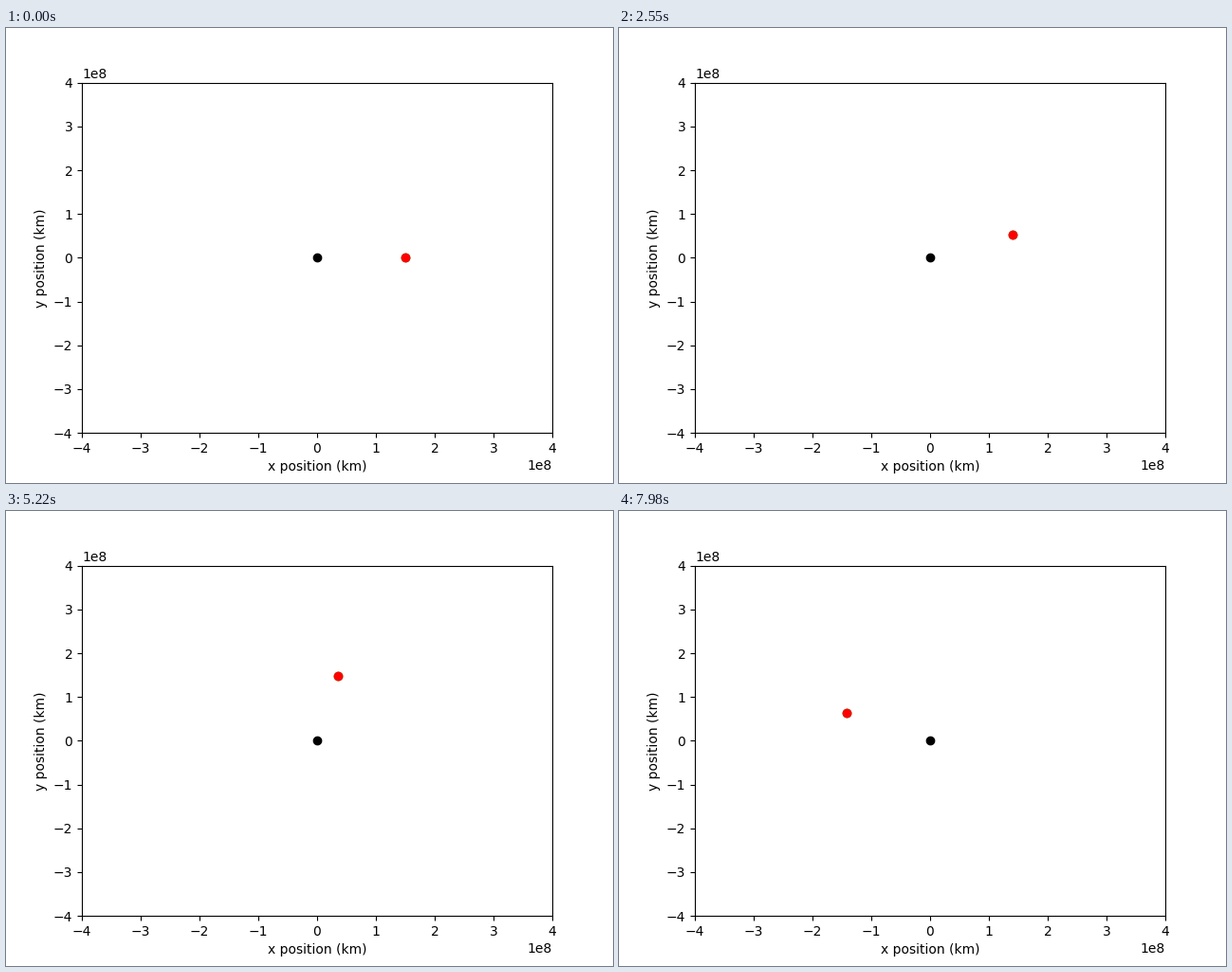
These frames come from a looping animation (640x480 px, 8 s). A matplotlib script:

```python
import math

import matplotlib.pyplot as plt
from matplotlib.animation import FuncAnimation

TICK_MS = 20
TICKS = 400
STEP_MS = 30           # the orbit advances once per step

# Planet orbit (km, degrees per step)
SEMI_MAJOR = 1.531e8
ECC = 0.0203
MEAN_MOTION = 8.702

# Moon orbit around the planet
MOON_DIST = 3.844e5
MOON_MOTION = 123.67


def planet_pos(step):
    """Kepler orbit starting at perihelion on the +x axis."""
    mean = math.radians(MEAN_MOTION * step)
    ecc_anom = mean
    for _ in range(6):
        ecc_anom = mean + ECC * math.sin(ecc_anom)
    x = SEMI_MAJOR * (math.cos(ecc_anom) - ECC)
    y = SEMI_MAJOR * math.sqrt(1 - ECC ** 2) * math.sin(ecc_anom)
    return x, y


def moon_pos(step):
    x, y = planet_pos(step)
    phase = math.radians(MOON_MOTION * step)
    return x + MOON_DIST * math.cos(phase), y + MOON_DIST * math.sin(phase)


fig, ax = plt.subplots(figsize=(6.4, 4.8), dpi=100)
ax.set_xlim(-4e8, 4e8)
ax.set_ylim(-4e8, 4e8)
ax.set_xlabel("x position (km)")
ax.set_ylabel("y position (km)")

ax.plot([0], [0], "ko")
planet, = ax.plot([], [], "go")
moon, = ax.plot([], [], "ro")


def place(dot, pos):
    dot.set_data([pos[0]], [pos[1]])


def update(tick):
    step = (tick * TICK_MS + TICK_MS // 2) // STEP_MS
    place(planet, planet_pos(step))
    place(moon, moon_pos(step))
    return planet, moon


def init():
    return update(0)


anim = FuncAnimation(fig, update, frames=TICKS, init_func=init,
                     interval=TICK_MS, repeat=True, repeat_delay=0)
plt.show()
```
